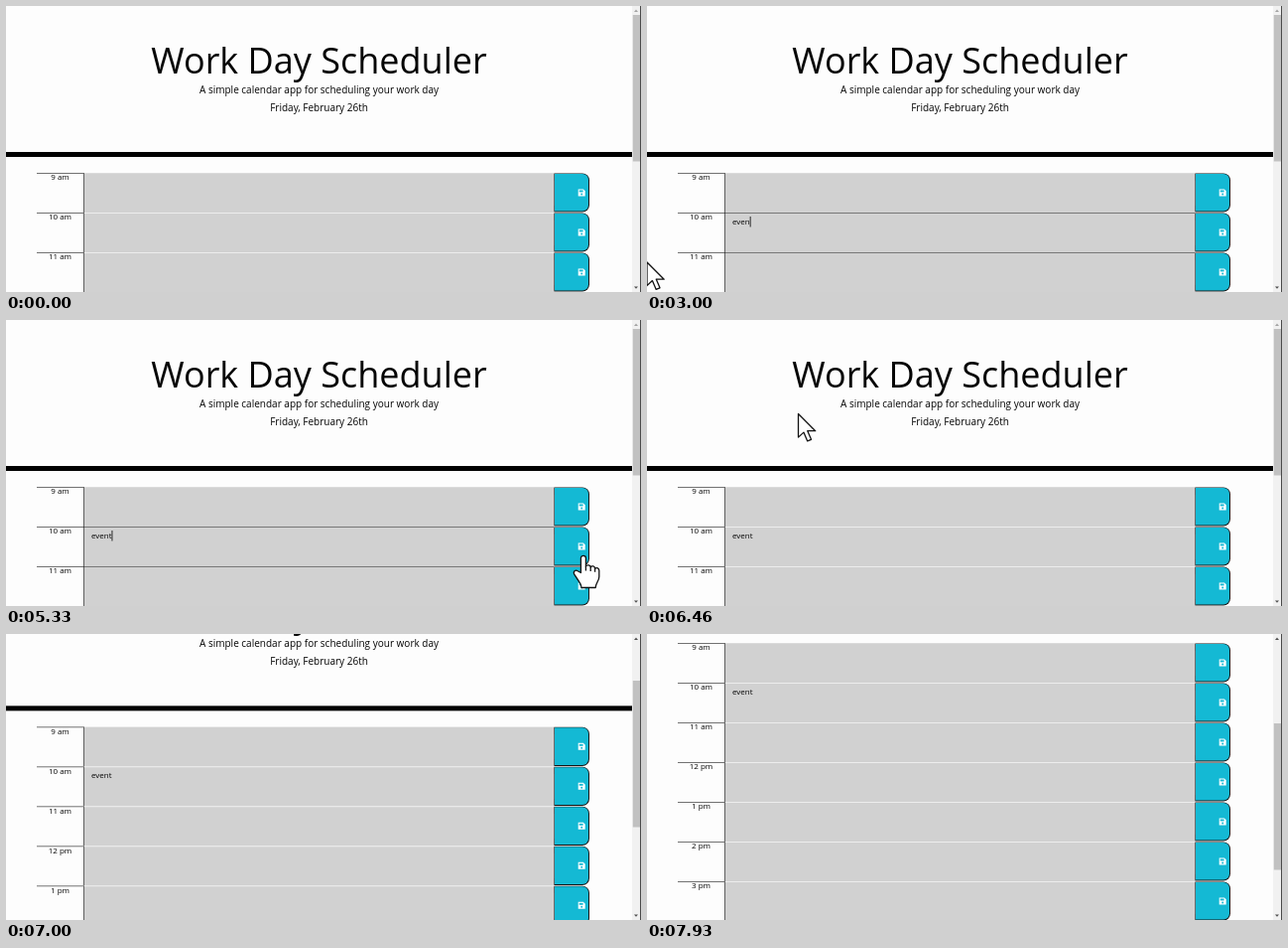
An HTML page with a canvas that plays this animation: 640 px wide and 288 px high, repeating every 8000 ms.

```html
<!DOCTYPE html>
<html lang="en">
<head>
<meta charset="utf-8">
<title>Work Day Scheduler</title>
<style>
  html, body { margin: 0; width: 100%; height: 100%; overflow: hidden; background: #fdfdfd; }
  canvas { display: block; width: 640px; height: 288px; }
</style>
</head>
<body>
<canvas id="stage"></canvas>
<script>
const W = 640, H = 288, LOOP = 8000;
const canvas = document.getElementById('stage');
const ctx = canvas.getContext('2d');
const dpr = window.devicePixelRatio || 1;
canvas.width = W * dpr;
canvas.height = H * dpr;

const FONT = '"Open Sans", "Noto Sans", sans-serif';
const PAGE_W = 631, CENTER = 315.5;
const ROW_TOP = 168, ROW_H = 40, MAX_SCROLL = 240.5;
const LABEL_X = 31, AREA_X = 78, BTN_X = 552.4, BTN_R = 588;
const HAIR = 0.55;
const HOURS = ['9 am', '10 am', '11 am', '12 pm', '1 pm', '2 pm', '3 pm', '4 pm', '5 pm'];
const CYAN = '#14b9d4';

const WORD = 'event';
const KEYS = [2260, 2600, 2800, 3000, 3200];
const FOCUS = 935, BLUR = 5430, BLINK = 532;

// time, x, y of the pointer's hot spot
const POINTER = [
  [0, 300, 190], [255, 290, 172], [430, 162, 49], [595, 200, 170],
  [1200, 200, 228], [1330, 56, 240], [1455, 0, 258], [3200, 0, 258],
  [3320, -24, 262], [4190, -24, 262], [4200, 39, 262], [4330, 80, 250],
  [4600, 592, 160], [4730, 626, 137], [4870, 622, 185], [5000, 599, 228],
  [5130, 582, 237.5], [5790, 582, 237.5], [5930, 625, 205], [6060, 600, 150],
  [6460, 152.5, 94.5], [6650, 154, 97], [6860, 181.5, 132.5], [7000, 205, 172]
];
const SCROLL = [[6794, 0], [7461, MAX_SCROLL], [7490, MAX_SCROLL], [7930, 159]];

function track(keys, t) {
  if (t <= keys[0][0]) return keys[0].slice(1);
  for (let i = 1; i < keys.length; i++) {
    const a = keys[i - 1], b = keys[i];
    if (t < b[0]) {
      const k = (t - a[0]) / (b[0] - a[0]);
      return a.slice(1).map((v, j) => v + (b[j + 1] - v) * k);
    }
  }
  return keys[keys.length - 1].slice(1);
}

function rect(x, y, w, h, color) {
  ctx.fillStyle = color;
  ctx.fillRect(x, y, w, h);
}

function text(str, x, y, size, align) {
  ctx.font = `400 ${size}px ${FONT}`;
  ctx.textAlign = align;
  ctx.fillStyle = '#050505';
  ctx.fillText(str, x, y);
}

function poly(points, color) {
  ctx.beginPath();
  points.forEach(([x, y]) => ctx.lineTo(x, y));
  ctx.closePath();
  ctx.fillStyle = color;
  ctx.fill();
}

function header() {
  text('Work Day Scheduler', CENTER, 68, 36, 'center');
  text('A simple calendar app for scheduling your work day', CENTER, 88, 10, 'center');
  text('Friday, February 26th', CENTER, 106, 10, 'center');
  rect(0, 147, PAGE_W, 5, '#000');
}

function saveIcon(x, y) {
  poly([[x, y], [x + 5.2, y], [x + 7, y + 1.8], [x + 7, y + 7], [x, y + 7]], '#fff');
  rect(x + 1, y + 1, 3.9, 1.9, CYAN);
  ctx.beginPath();
  ctx.arc(x + 3.5, y + 4.9, 1, 0, 7);
  ctx.fill();
}

function tab(x, y, right, bottom, radius, color) {
  ctx.beginPath();
  ctx.roundRect(x, y, right - x, bottom - y, [0, radius, radius, 0]);
  ctx.fillStyle = color;
  ctx.fill();
}

// the border is heavier on the right and bottom edges
function button(y) {
  tab(BTN_X, y + 0.4, BTN_R, y + 39.6, 7, '#161616');
  tab(BTN_X + 0.6, y + 1, BTN_R - 1, y + 38.6, 6, CYAN);
  saveIcon(576.7, y + 16.5);
}

function row(label, i, focused) {
  const y = ROW_TOP + i * ROW_H, line = y + 0.25;
  rect(AREA_X, line, BTN_X - AREA_X, ROW_H, '#d1d1d1');
  if (i) rect(AREA_X, line, BTN_X - AREA_X, HAIR, focused ? '#2a2a2a' : '#fff');
  rect(LABEL_X, line, AREA_X - LABEL_X, HAIR, '#000');
  rect(AREA_X, y, HAIR, ROW_H, '#000');
  text(label, 54.5, y + 7.4, 8, 'center');
  button(y);
}

function entry(t, focused) {
  const x = 86, y = ROW_TOP + ROW_H;
  const str = WORD.slice(0, KEYS.filter(k => t >= k).length);
  text(str, x, y + 12, 8, 'left');
  if (!focused) return;
  const last = [FOCUS, ...KEYS].filter(k => t >= k).pop();
  if ((t - last) % (2 * BLINK) < BLINK) {
    rect(x + ctx.measureText(str).width, y + 4, 0.8, 10.5, '#000');
  }
}

function scrollbar(scroll) {
  const mid = 635;
  rect(PAGE_W, 0, 8, H, '#f1f1f1');
  rect(PAGE_W + 0.8, 9 + scroll / MAX_SCROLL * 122.5, 7.2, 147.5, '#c1c1c1');
  poly([[mid - 2, 6], [mid, 3.6], [mid + 2, 6]], scroll > 0 ? '#505050' : '#a3a3a3');
  poly([[mid - 2, 282.4], [mid, 284.8], [mid + 2, 282.4]],
    scroll < MAX_SCROLL ? '#505050' : '#a3a3a3');
  rect(639, 0, 1, H, '#4a4a4a');
}

const arrow = new Path2D('M0 0V23.6L5.4 18.6L9.2 27.4L13 25.8L9.3 17.2H17.2Z');
const hand = new Path2D(
  'M-2.6 17V2.4C-2.6 -1 2.4 -1 2.4 2.4V10.5C3.6 8.6 7 9 7.2 11.3' +
  'C8.6 9.7 11.4 10.3 11.6 12.6C13.4 11.4 15.8 12.4 15.8 14.8' +
  'V21C15.8 25 12.6 27 12.2 32H-2C-2 28 -5 25.5 -6.6 22.6L-9.4 18.4' +
  'C-10.6 16 -8.2 13.6 -5.8 15.2Z');
const knuckles = new Path2D('M2.4 10.5V15M7.2 11.3V15.6M11.6 12.6V16.2');

function pointer(t, scroll) {
  const [x, y] = track(POINTER, t);
  const inRows = y > ROW_TOP - scroll;
  // no pointer is drawn over the text fields
  if (inRows && x > AREA_X && x < BTN_X) return;
  const overButton = inRows && x >= BTN_X && x < BTN_R;
  const shape = overButton ? hand : arrow;
  ctx.save();
  ctx.translate(x, y);
  ctx.lineWidth = 1.3;
  ctx.lineJoin = 'round';
  ctx.strokeStyle = '#111';
  ctx.fillStyle = '#fff';
  ctx.fill(shape);
  ctx.stroke(shape);
  if (overButton) ctx.stroke(knuckles);
  ctx.restore();
}

function draw(t) {
  const [scroll] = track(SCROLL, t);
  const focused = t >= FOCUS && t < BLUR;
  ctx.setTransform(dpr, 0, 0, dpr, 0, 0);
  rect(0, 0, W, H, '#fdfdfd');
  ctx.save();
  ctx.translate(0, -scroll);
  header();
  HOURS.forEach((label, i) => row(label, i, focused));
  entry(t, focused);
  ctx.restore();
  scrollbar(scroll);
  pointer(t, scroll);
}

const start = performance.now();
function frame() {
  draw((performance.now() - start) % LOOP);
  requestAnimationFrame(frame);
}
frame();
</script>
</body>
</html>
```
